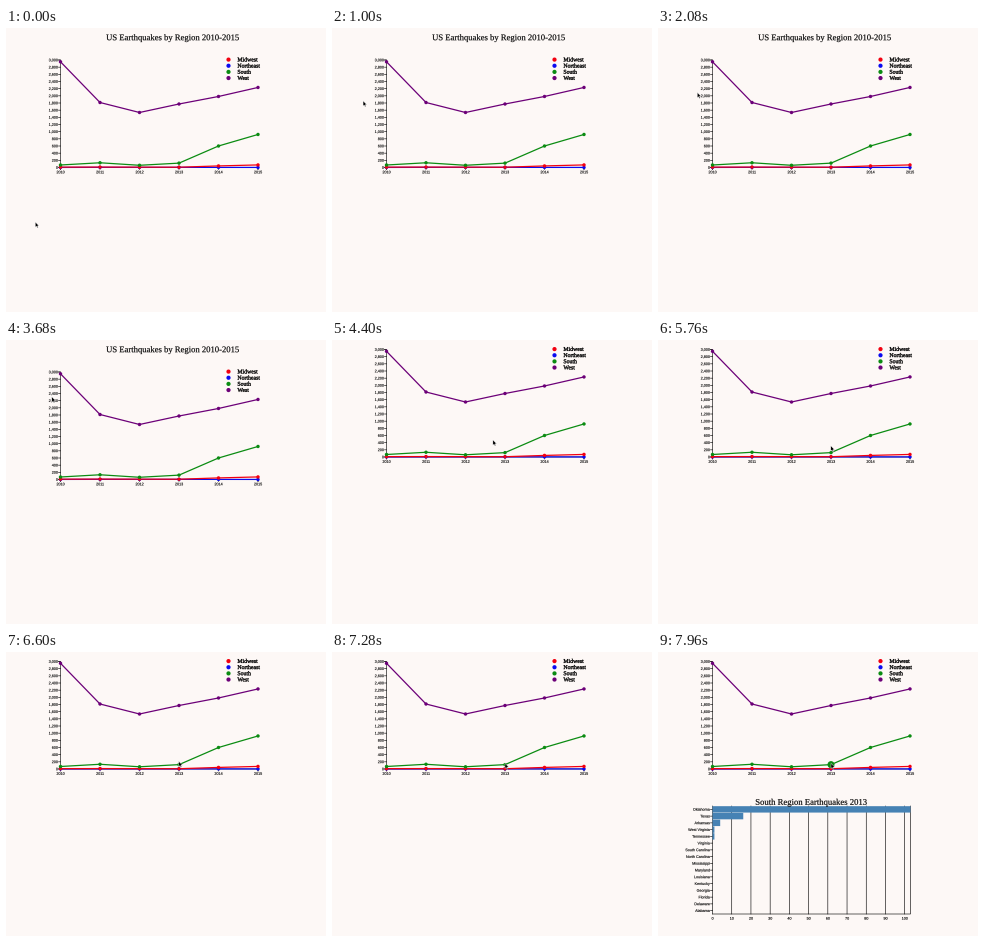
A matplotlib script for the animation above (8 s loop, 320 px wide and 284 px high).

```python
import numpy as np
import matplotlib.pyplot as plt
from matplotlib.animation import FuncAnimation
from matplotlib.patches import Circle, PathPatch, Polygon, Rectangle
from matplotlib.textpath import TextPath
from matplotlib.transforms import Affine2D

W, H, DPI = 320, 284, 100
STEP, LOOP = 40, 8000
PX = 72 / DPI
SCROLL_AT, BARS_AT, SCROLL_BY = 4000, 7400, 22.5
RED, BLUE, GREEN, PURPLE = "#f20010", "#0a0af0", "#0b8c12", "#6c0078"
SERIF, SANS = "Liberation Serif", "Liberation Sans"

fig = plt.figure(figsize=(W / DPI, H / DPI), dpi=DPI, facecolor="#fdf8f6")
ax = fig.add_axes([0, 0, 1, 1])
ax.set(xlim=(0, W), ylim=(H, 0))
ax.axis("off")

fixed = ax.transData
shift = Affine2D()
page = shift + fixed


def label(x, y, s, size, align=0, font=SERIF, tf=fixed, bold=0.15):
    """Outline text; align is 0 for left, 0.5 for centre, 1 for right."""
    path = TextPath((0, 0), s, size=size, prop={"family": font})
    x -= align * path.get_extents().x1
    place = Affine2D().scale(1, -1).translate(x, y)
    return ax.add_artist(PathPatch(path, fc="black", ec="black", lw=bold * PX,
                                   snap=False, zorder=4,
                                   transform=place + tf))


def small(x, y, s, align, tf=fixed):
    return label(x, y + 1.3, s, 3.7, align, SANS, tf, 0.1)


def line(xs, ys, color="black", width=0.6, tf=fixed, z=2):
    return ax.plot(xs, ys, color=color, lw=width * PX, zorder=z, snap=False,
                   solid_joinstyle="round", transform=tf)[0]


def dot(x, y, color, r, tf=fixed, z=3):
    return ax.add_artist(Circle((x, y), r, fc=color, ec="none", zorder=z,
                                snap=False, transform=tf))


# Line chart
LEFT, RIGHT, TOP, BASE = 54.5, 252, 32, 139.5
years = np.linspace(LEFT, RIGHT, 6)


def quake_y(n):
    return BASE - np.asarray(n) * (BASE - TOP) / 3000


label(166.5, 12.2, "US Earthquakes by Region 2010-2015", 8.62, 0.5, tf=page)
line([LEFT - 2, LEFT, LEFT, LEFT - 2], [TOP, TOP, BASE, BASE], tf=page)
line([LEFT, LEFT, RIGHT, RIGHT], [BASE + 2, BASE, BASE, BASE + 2], tf=page)
for n in range(0, 3001, 200):
    y = quake_y(n)
    line([LEFT - 2, LEFT], [y, y], tf=page)
    small(51.8, y, f"{n:,}", 1, page)
for i, x in enumerate(years):
    line([x, x], [BASE, BASE + 2], tf=page)
    small(x, 144, str(2010 + i), 0.5, page)

regions = [
    ("Northeast", BLUE, [2, 4, 3, 4, 3, 2]),
    ("Midwest", RED, [10, 12, 10, 8, 44, 72]),
    ("South", GREEN, [70, 132, 62, 122, 600, 922]),
    ("West", PURPLE, [2950, 1814, 1535, 1772, 1982, 2234]),
]
for name, color, counts in regions:
    line(years, quake_y(counts), color, 1.25, page)
    for x, y in zip(years, quake_y(counts)):
        dot(x, y, color, 1.7, page)
for i, (name, color) in enumerate([("Midwest", RED), ("Northeast", BLUE),
                                   ("South", GREEN), ("West", PURPLE)]):
    y = 31.6 + 6.15 * i
    dot(222.5, y, color, 2.1, page)
    label(231.4, y + 1.8, name, 5.8, tf=page, bold=0.3)

# Bar chart
B_TOP, B_BASE, UNIT = 154, 262, 1.922
B_RIGHT = LEFT + 103 * UNIT
states = ["Oklahoma", "Texas", "Arkansas", "West Virginia", "Tennessee",
          "Virginia", "South Carolina", "North Carolina", "Mississippi",
          "Maryland", "Louisiana", "Kentucky", "Georgia", "Florida",
          "Delaware", "Alabama"]
counts = [103, 16, 4, 1, 1] + [0] * 11
row = (B_BASE - B_TOP) / len(states)

bars = [label(153, 152.8, "South Region Earthquakes 2013", 8.66, 0.5)]
for i, (state, n) in enumerate(zip(states, counts)):
    y = B_TOP + row * (i + 0.5)
    bars.append(small(51.8, y, state, 1))
    bars.append(line([LEFT - 2, LEFT], [y, y]))
    if n:
        bars.append(ax.add_patch(Rectangle((LEFT, y - 3.2), n * UNIT, 6.4,
                                           fc="#4682b4", ec="none",
                                           snap=False, zorder=2.5)))
for n in range(0, 101, 10):
    x = LEFT + n * UNIT
    bars.append(line([x, x], [B_TOP, B_BASE]))
    bars.append(small(x, 266.3, str(n), 0.5))
bars.append(line([LEFT, B_RIGHT, B_RIGHT], [B_BASE, B_BASE, B_TOP]))
bars.append(dot(years[3], quake_y(122), GREEN, 3.5, page))

# Pointer
ARROW = np.array([(0, 0), (0, 5.2), (1.2, 4.2), (2, 6), (2.9, 5.6),
                  (2.1, 3.9), (3.7, 3.8)])
pointer = ax.add_patch(Polygon(ARROW, fc="black", ec="white", snap=False,
                               lw=0.35 * PX, zorder=9))

# Start, end, then first point, control point and last point
moves = [
    (320, 1160, (29.3, 194), (-8, 106), (39.3, 64.5)),
    (2640, 3400, (39.3, 64.5), (44, 63), (45.8, 56.8)),
    (4160, 4480, (45.8, 56.8), (120, 66), (180, 114)),
    (4480, 4840, (180, 114), (166, 78), (169, 93.8)),
    (5080, 5720, (169, 93.8), (171, 98), (172.8, 105.8)),
    (6200, 6900, (172.8, 105.8), (172.6, 109), (173, 111.3)),
]


def tip(t):
    pos = np.array(moves[0][2])
    for start, end, a, b, c in moves:
        if t < start:
            break
        u = min(1, (t - start) / (end - start))
        u = u * u * (3 - 2 * u)
        a, b, c = map(np.array, (a, b, c))
        pos = (1 - u) ** 2 * a + 2 * u * (1 - u) * b + u * u * c
    return pos


def update(i):
    t = i * STEP
    shift.clear().translate(0, -SCROLL_BY if t >= SCROLL_AT else 0)
    for artist in bars:
        artist.set_visible(t >= BARS_AT)
    pointer.set_xy(ARROW + tip(t))
    return []


anim = FuncAnimation(fig, update, frames=LOOP // STEP, interval=STEP,
                     init_func=lambda: update(0), repeat=True,
                     repeat_delay=0, blit=False)
plt.show()
```
